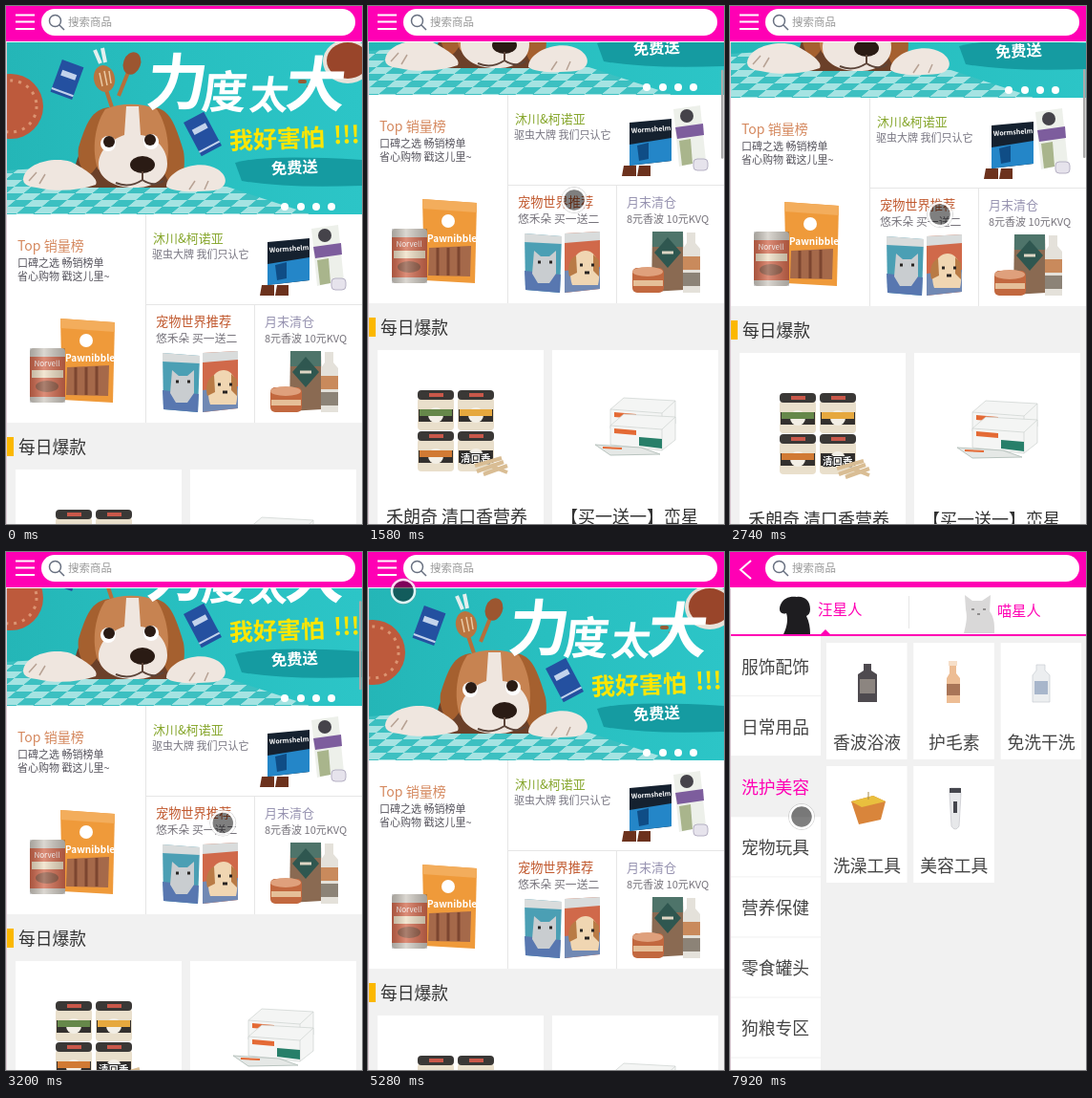
An HTML page for the animation above (7990 ms loop, 373 px wide and 542 px high).

```html
<!DOCTYPE html>
<html lang="zh-CN">
<meta charset="utf-8">
<title>宠物商城</title>
<style>
  html, body { margin: 0; height: 100%; overflow: hidden; background: #fff }
  svg { display: block; font-family: 'Noto Sans CJK SC', 'Noto Sans', sans-serif }
  .pink { fill: #ff00b4 }
  .line { fill: none; stroke: #e6e6e6 }
  .name { font-size: 17.8px; fill: #444 }
  .mid { text-anchor: middle }
  .brush { font-weight: 900; fill: #fff }
  .pack { fill: #2450a0 }
  .fur { fill: #efe6df }
  .ear { fill: #a5602f }
</style>
<svg width="373" height="542" viewBox="0 0 373 542">
  <defs>
    <linearGradient id="sea" x2="1"><stop stop-color="#24b6b7"/><stop offset=".5" stop-color="#28bfc0"/><stop offset="1" stop-color="#2cc5c7"/></linearGradient>
    <linearGradient id="shade" x2="1"><stop stop-color="#000" stop-opacity=".2"/><stop offset=".4" stop-color="#fff" stop-opacity=".25"/><stop offset="1" stop-color="#000" stop-opacity=".2"/></linearGradient>
    <pattern id="cloth" width="36" height="14" patternUnits="userSpaceOnUse" patternTransform="skewX(-50)">
      <path d="M0 0h36v14H0z" fill="#3cc0c1"/><path d="M0 0h18v7H0zM18 7h18v7H18z" fill="#a5e3e2"/>
    </pattern>
    <clipPath id="bannerBox"><path d="M0 38h373v180H0z"/></clipPath>
    <g id="bar">
      <path class="pink" d="M0 0h373v37H0z"/><path d="M0 37h373v1H0z" fill="#fff"/>
      <rect x="37" y="3" width="329" height="28" rx="14" fill="#fff"/>
      <path d="M56 20l5 5M57.500 15.500a6 6 0 1 1-12 0a6 6 0 1 1 12 0" fill="none" stroke="#687080" stroke-width="1.500"/>
      <text x="65" y="21" font-size="11.500" fill="#999">搜索商品</text>
    </g>
    <g id="jar">
      <rect y="8" width="38" height="34" rx="4" fill="#e9dfcb"/>
      <path d="M1 20h36v13H1z" fill="#33302e"/><circle cx="19" cy="26" r="8" fill="#f3efe6"/>
      <rect width="38" height="10" rx="4" fill="#3a3836"/><path d="M12 3h15v4H12z" fill="#c9584a"/>
    </g>
    <g id="carton">
      <path d="M0 12L14 0l54 3v24L54 38 0 32z" fill="#f4f5f4" stroke="#ccd2cf" stroke-width=".7"/>
      <path d="M0 12l54 4v22M54 16L68 3" fill="none" stroke="#ccd2cf" stroke-width=".7"/>
      <path d="M4 15l23 2v5L4 20z" fill="#e46a35"/><path d="M30 24l24 2v10l-24-3z" fill="#277f69"/>
    </g>
  </defs>

  <g id="home">
    <path d="M0 38h373v398H0z" fill="#fff"/><path d="M0 436h373v400H0z" fill="#f1f1f1"/>
    <g clip-path="url(#bannerBox)">
      <path d="M0 38h373v180H0z" fill="url(#sea)"/>
      <path d="M0 172l70-4 140 14 110 36H0z" fill="url(#cloth)"/>
      <circle cx="5" cy="105" r="34" fill="#bd5a3c"/><circle cx="5" cy="105" r="27" fill="none" stroke="#db9472" stroke-width="3" stroke-dasharray="3 6"/>
      <path d="M93 46l6 14M101 44l3 15" stroke="#e4efee" stroke-width="4"/>
      <path d="M131 62l-13 32M105 88l6 18" stroke="#b66f3a" stroke-width="4"/>
      <ellipse cx="132" cy="60" rx="9" ry="12" transform="rotate(20 132 60)" fill="#9c5630"/>
      <ellipse cx="103" cy="76" rx="11" ry="14" transform="rotate(-12 103 76)" fill="#b9743f"/>
      <path d="M98 70l3 14M103 68l3 15M108 68l2 13" stroke="#e9c9a4" stroke-width="1.500"/>
      <g transform="translate(64 77) rotate(20)"><path class="pack" d="M-12-18h24v36h-24z"/><path d="M-8-8H8v6H-8zM-12 13h24v2h-24z" fill="#c3d3ec"/></g>
      <g transform="translate(206 134) rotate(-28)"><path class="pack" d="M-12-20h24v40h-24z"/><path d="M-8-9H8v6H-8zM-12 14h24v2h-24z" fill="#c3d3ec"/></g>
      <path d="M74 190c-6-22 2-40 16-50l82 4c12 16 14 32 10 46z" fill="#6b4029"/>
      <path class="ear" d="M108 106c-18 2-24 16-32 42-2 14 4 28 12 28 14-10 18-40 20-70z"/>
      <path class="ear" d="M155 106c16 2 22 16 31 46 3 18-2 36-10 38-14-10-20-50-21-84z"/>
      <path d="M104 108c16-7 38-7 54 0 12 18 14 44 10 58-10 24-56 26-72 4-6-18-4-44 8-62z" fill="#c78351"/>
      <path class="fur" d="M126 105h13l2 30c18 2 28 16 28 30 0 20-22 26-36 25-20 0-36-10-36-24 0-14 12-26 27-31z"/>
      <g fill="#fff"><circle cx="107" cy="144" r="8"/><circle cx="152" cy="142" r="8"/></g>
      <g fill="#2a1b14"><circle cx="108" cy="142" r="6"/><circle cx="151" cy="140" r="6"/><ellipse cx="143" cy="166" rx="13" ry="9"/></g>
      <path d="M143 173v9q-14 9-28 3m28-3q12 8 22 1" fill="none" stroke="#5c453a" stroke-width="2"/>
      <path class="fur" d="M18 181c2-16 30-24 50-18 16 8 30 18 26 24-18 6-40 8-62 3-10-1-14-4-14-9zM168 189c0-18 36-30 54-18 12 8 10 20-4 22-20 2-42 2-50-4z"/>
      <path d="M24 183l8-9M35 186l6-10M192 192l6-9M208 192l4-9" stroke="#b7a294" stroke-width="1.500"/>
      <ellipse cx="358" cy="58" rx="26" ry="23" fill="#e8e2da"/><ellipse cx="358" cy="57" rx="22" ry="19" fill="#99452a"/>
      <path d="M308 79h5m4 6h5m9-11h5" stroke="#935c36" stroke-width="4" stroke-linecap="round"/>
      <path d="M240 164q30-9 133-3v27q-80 3-126-5z" fill="#159ba1"/>
      <g class="brush" transform="skewX(-6)">
        <text x="156" y="103" font-size="64">力</text><text x="215" y="107" font-size="47">度</text>
        <text x="265" y="108" font-size="41">太</text><text x="302" y="105" font-size="63">大</text>
      </g>
      <g class="brush" transform="rotate(-2 290 140)" style="fill:#ffe600"><text x="234" y="148" font-size="25">我好害怕</text><text x="343" y="146" font-size="25">!!!</text></g>
      <text class="brush" x="278" y="175" font-size="16.300" transform="rotate(-3 302 169)">免费送</text>
      <g fill="#fff"><circle cx="292" cy="210" r="4"/><circle cx="309" cy="210" r="4"/><circle cx="325" cy="210" r="4"/><circle cx="341" cy="210" r="4"/></g>
    </g>

    <path class="line" d="M146.500 218v218M146 312.500h227M260.500 312v124"/>
    <text x="12" y="256" font-size="14" fill="#d5895f">Top 销量榜</text>
    <g font-size="11" fill="#55535c"><text x="12" y="273">口碑之选 畅销榜单</text><text x="12" y="287">省心购物 戳这儿里~</text></g>
    <text x="154" y="248" font-size="13" fill="#86a62c">沐川&amp;柯诺亚</text>
    <text x="153" y="264" font-size="11" fill="#777580">驱虫大牌 我们只认它</text>
    <text x="157" y="335" font-size="13.200" font-weight="500" fill="#c0572c">宠物世界推荐</text>
    <text x="157" y="352" font-size="11.800" fill="#77747c">悠禾朵 买一送二</text>
    <text x="271" y="335" font-size="13" fill="#9692b0">月末清仓</text>
    <text x="271" y="352" font-size="11" fill="#77747c">8元香波 10元KVQ</text>

    <path d="M57 327l57 4-2 84-53-3z" fill="#ef9a3a"/><path d="M57 327l57 4v10l-57-4z" fill="#f3ad5c"/>
    <path d="M64 378l44-2-1 32-44-1z" fill="#a5694a"/><path d="M73 378v29m11-29v29m11-30v30" stroke="#7d4630" stroke-width="3"/>
    <circle cx="84" cy="350" r="7" fill="#fff"/><text x="62" y="372" font-size="10" font-weight="700" fill="#fff">Pawnibble</text>
    <rect x="25" y="358" width="37" height="57" rx="4" fill="#cfcac2"/><path d="M25 367h37v42H25z" fill="#d2694d"/>
    <text class="mid" x="43" y="377" font-size="8" fill="#fff">Norvell</text><path d="M27 381h33v8H27z" fill="#efdfc4"/><ellipse cx="43" cy="398" rx="12" ry="6" fill="#8f5640"/>
    <path d="M25 358h37v57H25z" fill="url(#shade)"/>

    <path d="M274 247l44-4v44l-44 5z" fill="#15212f"/><path d="M274 270l44-7v24l-44 5z" fill="#2486c8"/>
    <text x="276" y="258" font-size="7" font-weight="700" fill="#fff" transform="rotate(-4 276 258)">Wormshelm</text><path d="M282 271l12-3v17l-10 2z" fill="#0f4d86"/>
    <path d="M320 233l28-4 6 58-28 6z" fill="#edf0ea"/><path d="M322 252l29-4 1 12-28 4z" fill="#7d5d9d"/><path d="M326 266l12-2 2 26-11 2z" fill="#a9b58c"/><circle cx="334" cy="240" r="7" fill="#45434a"/>
    <path d="M268 292h13v11h-15zM284 292h12v11h-14z" fill="#6c321d"/><rect x="341" y="285" width="15" height="12" rx="4" fill="#e6e3ec" stroke="#b6b1c4"/>

    <path d="M164 363l39 3-2 59-36-3z" fill="#4b9fb4"/><path d="M164 402l38 4-1 19-36-3z" fill="#5877b0"/>
    <path d="M206 363l37-2v60l-37 4z" fill="#d0694a"/><path d="M206 402l37-4v23l-37 4z" fill="#7189b4"/>
    <path d="M164 363l39 3v8l-39-2zM206 363l37-2v9l-37 3z" fill="#d9dcdc"/>
    <path d="M172 405l2-24 7 6h9l7-6v24l-7 10h-12z" fill="#c9cdd0"/><path d="M214 417c-6-18 2-36 14-36s17 18 13 36z" fill="#f0d6b2"/>
    <path d="M218 386c-8 4-9 14-7 22l8-4zM236 385l6 6v17l-6-6z" fill="#b97b45"/>
    <path d="M178 393h3m9 0h3m29 3h3m9 0h3m-10 8h5" stroke="#292523" stroke-width="3"/>
    <path d="M298 361h32l1 61-34 2z" fill="#8a6a52"/><path d="M298 361h32v16h-32z" fill="#4e746a"/><path d="M314 367l14 16-14 16-14-16z" fill="#2f5750"/><path d="M308 383h12" stroke="#ded6c5" stroke-width="3"/>
    <rect x="277" y="399" width="33" height="26" rx="5" fill="#c2683f"/><ellipse cx="293" cy="403" rx="16" ry="5" fill="#dfa07c"/><path d="M278 412h31v6h-31z" fill="#e5bf98"/>
    <path d="M334 362h9v11l5 6v46h-18v-46l4-6z" fill="#e4e1da"/><path d="M330 387h18v14h-18z" fill="#c98a5c"/><path d="M330 404h18v14h-18z" fill="#8c8377"/>

    <path d="M1 451h7v20H1z" fill="#fbb800"/><text x="13" y="468" font-size="17.800" fill="#333">每日爆款</text>
    <path d="M10 485h174v300H10zM193 485h174v300H193z" fill="#fff"/>
    <use href="#jar" x="52" y="527"/><use href="#jar" x="94" y="527"/><use href="#jar" x="52" y="570"/><use href="#jar" x="94" y="570"/>
    <path d="M54 547h34v7H54z" fill="#66884a"/><path d="M96 547h34v7H96z" fill="#e6a83e"/><path d="M54 590h34v7H54z" fill="#d17a34"/>
    <text x="97" y="602" font-size="10.500" font-weight="700" fill="#fff" stroke="#222" stroke-width="2" paint-order="stroke">清口香</text>
    <path d="M112 606l28-8M114 612l28-10M121 615l25-9M128 606l18 7" stroke="#d9bd94" stroke-width="4"/>
    <use href="#carton" x="254" y="535"/><use href="#carton" x="254" y="552"/><path d="M238 584l48 3 20 7-52 1z" fill="#e5e8e6" stroke="#b9c4bf"/><path d="M246 587l20 1" stroke="#e46a35" stroke-width="2"/>
    <g font-size="18" fill="#333">
      <text x="19" y="666">禾朗奇 清口香营养</text><text x="19" y="691">洁齿咬胶 220G系</text>
      <text x="202" y="666">【买一送一】峦星</text><text x="202" y="691">益生菌5g*5袋-适用</text>
    </g>
    <g font-size="12.500" fill="#777" text-decoration="line-through"><text x="17" y="710">￥45</text><text x="200" y="710">￥50</text></g>
    <g font-size="15.500"><g class="pink"><text x="17" y="728">￥16.90</text><text x="200" y="728">￥39.80</text></g><g fill="#999"><text x="91" y="728">已售1619件</text><text x="274" y="728">已售2191件</text></g></g>
  </g>
  <rect id="thumb" x="370" width="2.500" height="93" rx="1" fill="#aaa"/>
  <use href="#bar"/><path d="M10 9.500h20M10 16.500h20M10 24h20" stroke="#fff" stroke-width="2"/>

  <g id="shop">
    <path d="M0 38h373v504H0z" fill="#f1f1f1"/><path d="M0 38h373v48H0z" fill="#fff"/>
    <use href="#bar"/><path d="M22 9L11 18.500 22 28" fill="none" stroke="#fff" stroke-width="2"/>
    <path class="line" d="M187.500 46v34"/><path class="pink" d="M0 86h95l5-5 5 5h268v2H0z"/>
    <path d="M56 86c4-8 5-16 3-22-5 2-9-2-6-9 3-7 10-9 17-8 8-1 14 4 14 13 0 4-2 6-4 7 3 6 4 12 4 19z" fill="#1e1d20"/>
    <path d="M245 85c4-15 3-20 2-25l-1-15 8 6h10l9-6-1 17c6 8 5 17 5 23z" fill="#d9d8d8"/><path d="M253 60h3m9 0h3m-9 5h3" stroke="#8f8d8d" stroke-width="2"/>
    <g class="pink" font-size="15.500"><text x="92" y="66">汪星人</text><text x="280" y="66.500" font-size="15.200">喵星人</text></g>
    <g id="menu"></g><g id="cards"></g>
    <g id="goods">
      <path d="M140 117h8v7l6 4v29h-20v-29l6-4z" fill="#4e4a4f"/><path d="M136 133h16v15h-16z" fill="#8c8580"/>
      <path d="M230 114h7v13l4 5v26h-14v-26l3-5z" fill="#edbd94"/><path d="M229 114h9v5h-9z" fill="#f6dfc9"/><path d="M227 138h14v12h-14z" fill="#a97557"/>
      <path d="M321 118h9v6l5 5v28h-18v-28l4-5z" fill="#eceef0" stroke="#c8ccd2" stroke-width=".7"/><path d="M319 135h14v14h-14z" fill="#a8b6cb"/>
      <path d="M127 261l23-6 13 6-5 19-23 5z" fill="#d9853b"/><path d="M127 261l23-6 13 6-25 6z" fill="#e9bf3e"/><path d="M145 251v8" stroke="#a68a4a"/>
      <path d="M230 253l1-6h10l1 6-2 34q-4 6-8 0z" fill="#e7e8ea" stroke="#c3c5ca" stroke-width=".7"/><path d="M230 247h12v5h-12zM234 261h4v12h-4z" fill="#45464d"/>
    </g>
  </g>
  <path d="M.5 38v504" stroke="#dccbd4"/>
  <g id="cursor" fill="none"><circle r="13.500" stroke="#888" stroke-opacity=".4"/><circle r="11" fill="#000" fill-opacity=".5"/><circle r="12" stroke="#fff" stroke-opacity=".85" stroke-width="2.500"/></g>
</svg>
<script>
  const $ = id => document.getElementById(id);
  const LOOP = 7990, STEP = 77.4, START = 165, PICKED = 2;

  const menu = ['服饰配饰', '日常用品', '洗护美容', '宠物玩具', '营养保健', '零食罐头', '狗粮专区', ''];
  $('menu').innerHTML = menu.map((label, i) => {
    const y = 88 + i * 63.1;
    return `<g><rect y="${y}" width="95" height="62" fill="#fff"/><text class="name" x="12" y="${y + 38.5}">${label}</text></g>`;
  }).join('');

  const items = ['香波浴液', '护毛素', '免洗干洗', '洗澡工具', '美容工具'];
  items.forEach((label, i) => {
    const x = 101 + i % 3 * 91.3, y = i < 3 ? 95 : 224;
    $('cards').innerHTML += `<rect x="${x}" y="${y}" width="84.500" height="122" fill="#fff"/>`;
    $('goods').innerHTML += `<text class="name mid" x="${x + 42.5}" y="${y + 111}">${label}</text>`;
  });

  // Keys: time, then values
  const scrollKeys = [[1342, 0], [1420, 30], [1573, 125], [1810, 168], [2115, 181], [2200, 183], [2734, 122],
    [3040, 76], [3430, 30], [3965, 30], [4050, 21], [4350, 0]];
  const cursorKeys = [[180, 290, 460], [330, 220, 336], [490, 220, 336], [870, 220, 339], [950, 220, 339], [1100, 220, 348],
    [1342, 220, 348], [1573, 216, 203], [1810, 215, 170], [2115, 215, 161], [2200, 215, 159], [2734, 220, 218],
    [3040, 224, 264], [3430, 232, 312], [3965, 232, 312], [4050, 234, 319], [4350, 238, 372], [4595, 238, 372],
    [5288, 37, 41], [5440, 36, 31], [5520, 29, 27], [6450, 29, 27], [6920, 65, 194], [7070, 65, 194],
    [7460, 71, 236], [7690, 71, 236], [7920, 75, 277]];
  const slideKeys = [[5690, 373], [6000, 0]];
  const fadeKeys = [[1342, 0], [1420, 1], [4600, 1], [4950, 0]];

  function at(keys, t) {
    const next = keys.findIndex(k => k[0] > t);
    if (next < 1) return keys.at(next).slice(1);
    const a = keys[next - 1], b = keys[next], p = (t - a[0]) / (b[0] - a[0]);
    return a.slice(1).map((v, i) => v + (b[i + 1] - v) * p);
  }
  const move = (id, x, y) => $(id).setAttribute('transform', `translate(${x} ${y})`);

  function draw(now) {
    const time = now % LOOP;
    // The screen refreshes in fixed steps
    const t = 180 + Math.floor((time - START) / STEP) * STEP;
    const [scroll] = at(scrollKeys, t);
    move('home', 0, -Math.round(scroll));
    move('thumb', 0, 38 + scroll * .23);
    $('thumb').style.opacity = at(fadeKeys, t)[0];
    move('shop', at(slideKeys, t)[0], 0);
    move('cursor', ...at(cursorKeys, t));
    $('cursor').style.display = time < 180 ? 'none' : '';
    const chosen = t > 7370 ? PICKED : 0;
    [...$('menu').children].forEach((row, i) => {
      row.firstChild.style.fill = i === chosen ? '#f1f1f1' : '#fff';
      row.lastChild.style.fill = i === chosen ? '#ff00b4' : '#444';
    });
    $('goods').style.display = t > 7440 ? '' : 'none';
    requestAnimationFrame(draw);
  }
  requestAnimationFrame(draw);
</script>
</html>
```
